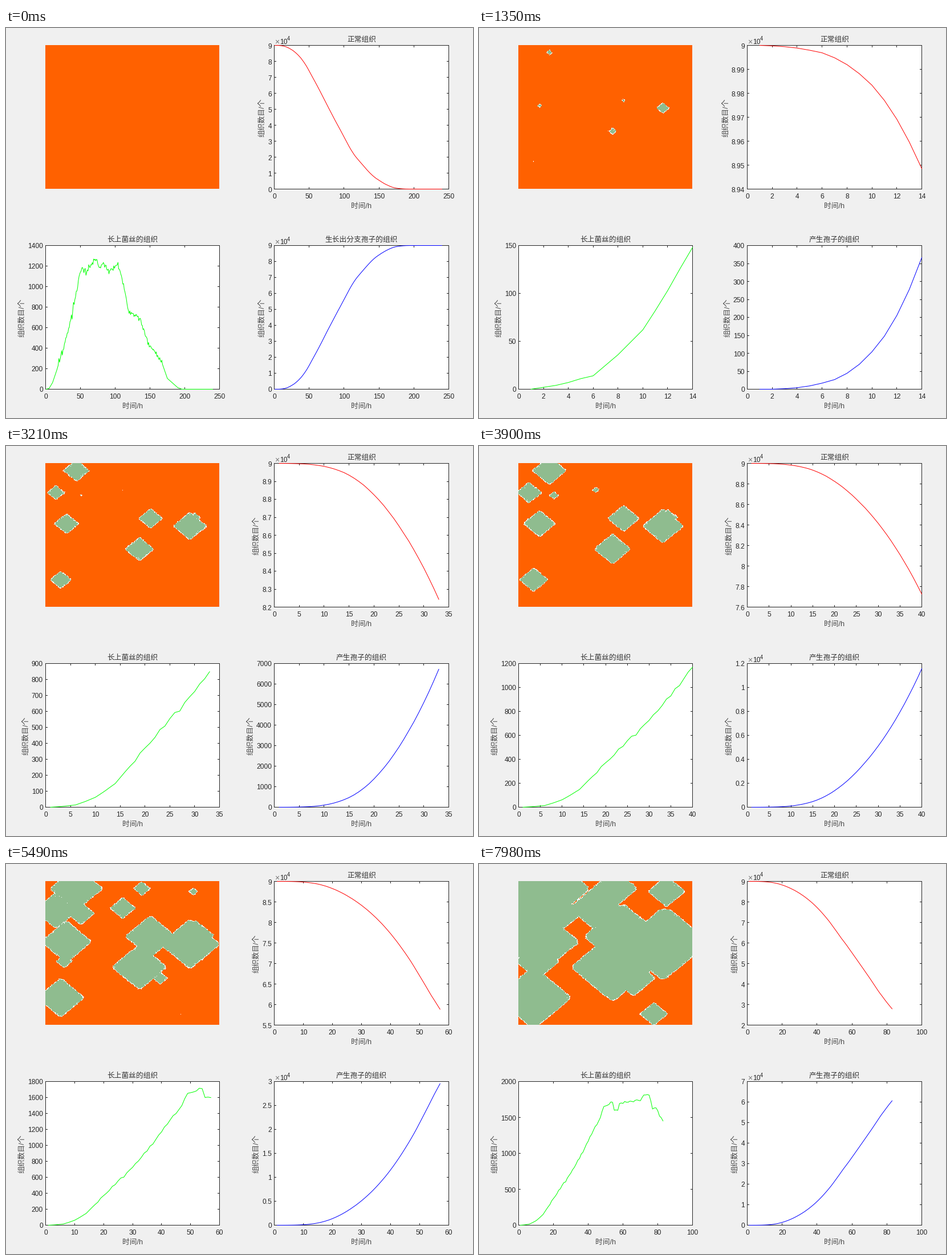
These frames come from a looping animation (819 by 684 pixels, 8000 ms). A matplotlib script:

```python
import math

import numpy as np
import matplotlib.pyplot as plt
from matplotlib.animation import FuncAnimation
from matplotlib.collections import LineCollection
from matplotlib.patches import Rectangle

W, H, DPI = 819, 684, 72          # at 72 dpi one point is one pixel
LOOP, INTERVAL = 8000, 25
FIRST, STEP, HOURS = 50, 96.6, 83  # time of the first hour, ms per hour
GRID, TOTAL = 300, 90000
SPEED, RIPENING = 0.9, 0.703      # cells per hour, chance to ripen per hour
INK, TITLE_INK, LABEL_INK = "#262626", "#333333", "#4a4a4a"
SANS = ["Liberation Sans", "Noto Sans CJK JP"]
PALETTE = np.array([[255, 97, 0], [255, 255, 255], [143, 188, 143]], np.uint8)
IMG_BOX = (69, 30, 374, 282)
rng = np.random.default_rng(7)

# Colony centres in stage pixels and the hour each one starts.
COLONIES = [
    (322.5, 140, 1.5), (331, 125, 22), (123, 43, 7.9), (87, 81, 16.2),
    (106, 136, 10), (253, 127, 10), (234, 180, 6), (95.5, 234.5, 13.2),
    (131, 86, 31), (204, 77, 32.9), (238, 43, 40.5), (102, 170, 41.8),
    (270, 200, 42.5), (328, 48, 48), (306, 263, 56.5),
]

# Bends of the hyphae curves: (hour, cells).
GROWING = [(1, 0), (3, 4), (6, 14), (8, 36), (10, 62), (12, 103), (14, 148),
           (20, 370), (30, 724), (36, 980), (47, 1508), (49, 1655),
           (54, 1710), (55, 1605), (57, 1605), (58, 1700), (70, 1735),
           (72, 1820), (75, 1815), (77, 1620), (79, 1630), (83, 1455)]
FINISHED = [(1, 0), (5, 8), (10, 65), (16, 185), (25, 390), (35, 645),
            (50, 1130), (53, 1190), (58, 1140), (72, 1265), (77, 1190),
            (83, 1220), (90, 1155), (103, 1215), (110, 1100), (119, 760),
            (135, 690), (147, 455), (165, 300), (175, 105), (190, 15),
            (196, 0), (240, 0)]


def run(bends, hours, roughness):
    """Hour, normal, hyphae and spore series of one infection."""
    t = np.arange(1, hours + 1)
    hyphae = np.interp(t, *zip(*bends))
    jitter = rng.normal(0, roughness, hours)
    hyphae = np.round(np.where(hyphae > 250, hyphae + jitter, hyphae))
    spores = RIPENING * np.concatenate([[0], np.cumsum(hyphae)[:-1]])
    return t, TOTAL - spores - hyphae, hyphae, spores


def rescaled(series):
    """The same run, with every cell turned to spores at its end."""
    t, _, hyphae, spores = series
    spores = spores * TOTAL / spores[-1]
    return t, np.clip(TOTAL - spores - hyphae, 0, TOTAL), hyphae, spores


def arrival_field():
    """Hour at which each cell is first reached by a colony."""
    rows, cols = np.mgrid[:GRID, :GRID]
    rough = rng.uniform(-0.6, 0.8, (GRID, GRID))
    rough += np.kron(rng.normal(0, 0.4, (60, 60)), np.ones((5, 5)))
    x0, y0, x1, y1 = IMG_BOX
    field = np.full((GRID, GRID), 1e6)
    for px, py, birth in COLONIES:
        dx = abs(cols - round((px - x0) / (x1 - x0) * GRID))
        dy = abs(rows - round((py - y0) / (y1 - y0) * GRID))
        # a diamond with blunt tips
        dist = np.maximum(0.94 * (dx + dy), np.maximum(dx, dy))
        reach = birth + dist / SPEED + rough * np.minimum(1, dist)
        field = np.minimum(field, reach)
    return np.ceil(field)


ARRIVAL = arrival_field()
RIPE = ARRIVAL + rng.geometric(RIPENING, (GRID, GRID))
NEW = run(GROWING, HOURS, 9)
OLD = rescaled(run(FINISHED, 240, 17))


def tissue(n):
    state = (ARRIVAL <= n).astype(int) + (RIPE <= n)
    return PALETTE[state]


def nice_ticks(lo, hi, most):
    """Tightest round limits with at most `most` intervals."""
    if lo == hi:
        lo, hi = lo - 1, hi + 1
    options = []
    for e in range(-2, 6):
        for m in (1, 2, 5):
            step = m * 10.0 ** e
            a = math.floor(lo / step + 1e-9)
            b = math.ceil(hi / step - 1e-9)
            if b - a <= most:
                options.append((round((b - a) * step, 6), step, a, b))
    _, step, a, b = min(options)
    return [round(k * step, 6) + 0.0 for k in range(a, b + 1)]


def text_width(label):
    return sum({".": 3.3, "-": 4}.get(c, 6.67) for c in label)


def pixel(v):
    """Centre of the pixel that holds v."""
    return math.floor(v + 1e-6) + 0.5


fig = plt.figure(figsize=(W / DPI, H / DPI), dpi=DPI, facecolor="#f0f0f0")
ax = fig.add_axes([0, 0, 1, 1])
ax.axis("off")


def put(x, y, s, size, ha="center", color=INK, **kw):
    return ax.text(x, y, s, fontsize=size, ha=ha, va="baseline",
                   color=color, family=SANS, **kw)


class Panel:
    def __init__(self, x0, y0, x1, y1, title, color):
        self.box = x0, y0, x1, y1
        mid = (x0 + x1) / 2
        ax.add_patch(Rectangle((x0, y0), x1 - x0, y1 - y0, fc="white",
                               ec=INK, lw=1, zorder=1, snap=False))
        self.title = put(mid, y0 - 6.3, title, 12.7, color=TITLE_INK)
        put(mid, y1 + 33.2, "时间/h", 12.7, color=LABEL_INK)
        self.ylabel = put(x0, (y0 + y1) / 2 + 1, "组织数目/个", 12.7,
                          color=LABEL_INK, rotation=90,
                          rotation_mode="anchor")
        self.ticks = LineCollection([], colors=INK, linewidths=1, zorder=2)
        self.ticks.set_snap(False)
        ax.add_collection(self.ticks, autolim=False)
        self.line, = ax.plot([], [], color=color, lw=1, zorder=3)
        self.power = [put(x0 + 0.5, y0 - 2.2, "×", 14, "left", "#777777"),
                      put(x0 + 9.5, y0 - 2.2, "10", 12, "left"),
                      put(x0 + 22.5, y0 - 8, "4", 9.5, "left")]
        self.labels = []

    def show(self, xs, ys):
        x0, y0, x1, y1 = self.box
        for label in self.labels:
            label.remove()
        self.labels = []
        xt = nice_ticks(xs[0], xs[-1], 8)
        yt = nice_ticks(min(ys), max(ys), 9)

        def to_x(v):
            return x0 + (v - xt[0]) / (xt[-1] - xt[0]) * (x1 - x0)

        def to_y(v):
            return y1 - (v - yt[0]) / (yt[-1] - yt[0]) * (y1 - y0)

        big = max(map(abs, yt)) >= 1e4
        for part in self.power:
            part.set_visible(big)
        segs, widest = [], 0
        for v in xt:
            x = pixel(to_x(v))
            segs += [[(x, y1), (x, y1 - 3.5)], [(x, y0), (x, y0 + 3.5)]]
            self.labels.append(put(to_x(v), y1 + 16.3, f"{v:g}", 12))
        for v in yt:
            y = pixel(to_y(v))
            segs += [[(x0, y), (x0 + 3.5, y)], [(x1, y), (x1 - 3.5, y)]]
            s = f"{v / 1e4 if big else v:.7g}"
            widest = max(widest, text_width(s))
            self.labels.append(put(x0 - 4.5, to_y(v) + 5, s, 12, "right"))
        self.ticks.set_segments(segs)
        self.ylabel.set_x(x0 - 16 - widest + 4.8)
        self.line.set_data(to_x(np.asarray(xs, float)),
                           to_y(np.asarray(ys, float)))


x0, y0, x1, y1 = IMG_BOX
picture = ax.imshow(tissue(0), extent=(x0, x1, y1, y0), aspect="auto",
                    interpolation="nearest", zorder=1)
normal = Panel(470.5, 30.5, 776.5, 282.5, "正常组织", "#ff0000")
hyphae = Panel(69.5, 381.5, 374.5, 633.5, "长上菌丝的组织", "#00ff00")
spores = Panel(470.5, 381.5, 776.5, 633.5, "", "#0000ff")
ax.set_xlim(0, W)
ax.set_ylim(H, 0)
shown = {"hour": None}


def update(i):
    n = max(0, math.floor((i * INTERVAL - FIRST) / STEP) + 1)
    if n == shown["hour"]:
        return
    shown["hour"] = n
    picture.set_data(tissue(n))
    spores.title.set_text("产生孢子的组织" if n else "生长出分支孢子的组织")
    t, *series = [s[:n] for s in NEW] if n else OLD
    for panel, values in zip((normal, hyphae, spores), series):
        panel.show(t, values)


anim = FuncAnimation(fig, update, frames=LOOP // INTERVAL, interval=INTERVAL,
                     init_func=lambda: update(0), repeat=True,
                     repeat_delay=0, blit=False)
plt.show()
```
